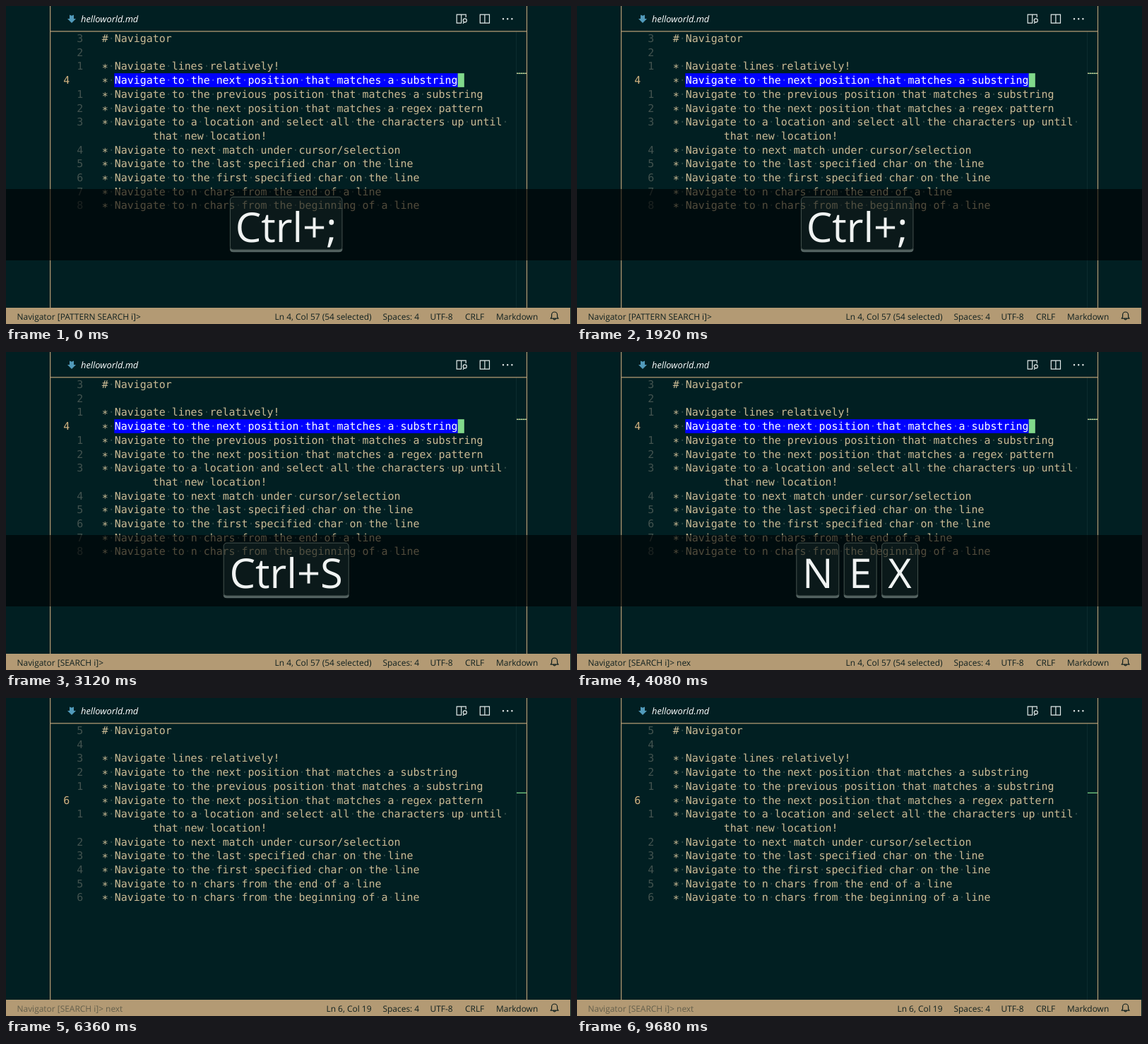
An HTML page that plays this animation: 800x450 px, repeating every 9.72 s.

```html
<!DOCTYPE html>
<html lang="en">
<head>
<meta charset="utf-8">
<title>Navigator</title>
<style>
  html, body { margin: 0; height: 100%; overflow: hidden; background: #011f22; }
  svg { display: block; width: 800px; height: 450px; text-rendering: geometricPrecision; }
  .code { font: 14.95px "DejaVu Sans Mono", monospace; fill: #cbbb95; white-space: pre; }
  .dot { fill: #2f4947; }
  .gutter { fill: #43534f; text-anchor: end; }
  .gutter.active { fill: #d3b381; text-anchor: start; }
  .selected { fill: #fff; }
  .selected .dot { fill: #5560ee; }
  .ui { font: 11.95px "Open Sans", "Noto Sans", sans-serif; fill: #10201f; }
  .title { font: italic 12.85px "Open Sans", "Noto Sans", sans-serif; fill: #fff; }
  .key { font: 58px "Open Sans", "Noto Sans", sans-serif; fill: #f0f3f2; text-anchor: middle; }
  .icon { fill: none; stroke: #e4eae9; stroke-width: 1.2; }
</style>
</head>
<body>
<svg viewBox="0 0 800 450">
  <rect width="800" height="450" fill="#011f22"/>
  <g id="lines"></g>
  <g id="selection"></g>
  <g id="cursor">
    <rect width="9.1" height="19.7" fill="#81d98b"/>
    <text id="under" class="code" y="15" style="fill:#011f22"></text>
  </g>

  <path d="M722.5 36V427" stroke="#0c2c2f"/>
  <path id="mark" d="M723 0H737.5" stroke="#6fc17b" stroke-width="1.4"/>
  <path id="markDashes" d="M723 0H737.5" stroke="#d2c49c" stroke-width="1.3" stroke-dasharray="2 1"/>
  <path d="M62.6 0V427M737.5 0V427M62 35.9H738" stroke="#b59b74" stroke-width="1.2"/>

  <path d="M90 12.5l3 1.2 3-1.2V18h3l-6 6-6-6h3z" fill="#519aba"/>
  <text class="title" x="106" y="23">helloworld.md</text>
  <g class="icon">
    <path d="M645 24.2H638.2V12.2H651.2V16M644.7 12.2V24.2M647 24.8l2-2.2"/>
    <circle cx="649.8" cy="20.4" r="2.5"/>
    <path d="M671.3 12.2H684.5V24.2H671.3zM677.9 12.2V24.2"/>
  </g>
  <path d="M704 18.2h.01M710.2 18.2h.01M716.4 18.2h.01" stroke="#e4eae9" stroke-width="2.4" stroke-linecap="round"/>

  <rect y="427" width="799" height="23" fill="#b39a74"/>
  <g class="ui">
    <text id="prompt" x="15.5" y="444"></text>
    <text id="position" x="517.5" y="444" text-anchor="end"></text>
    <text x="533.5" y="444">Spaces: 4</text>
    <text x="600.5" y="444">UTF-8</text>
    <text x="650" y="444">CRLF</text>
    <text x="694" y="444">Markdown</text>
  </g>
  <path class="icon" style="stroke:#10201f" d="M771.3 442.2l1.3-2.4V437a4 4 0 0 1 8 0v2.8l1.3 2.4zM775 442.6a1.7 1.7 0 0 0 3.3 0"/>

  <g id="overlay">
    <rect y="259" width="800" height="101" fill-opacity=".6"/>
    <g id="keys"></g>
  </g>
</svg>
<script>
const LOOP = 9720, LEFT = 135.7, PITCH = 9, ROW = 19.69, TOP = 36.1;
const CTRL_S = 2520, ENTER = 4440, HIDE = 5450, FADE = 250;
const TYPED = [['N', 3600], ['E', 3800], ['X', 4000], ['T', 4220], ['Enter', ENTER]];
const KEY_WIDTH = { 'Ctrl+;': 159.5, 'Ctrl+S': 178, N: 61, E: 47, X: 52, T: 47, Enter: 150 };
const TARGET = 'Navigate to the next position that matches a substring';
const WRAPPED = 7;
const ROWS = [
  '# Navigator', '', '∗ Navigate lines relatively!',
  '∗ ' + TARGET,
  '∗ Navigate to the previous position that matches a substring',
  '∗ Navigate to the next position that matches a regex pattern',
  '∗ Navigate to a location and select all the characters up until ',
  'that new location!',
  '∗ Navigate to next match under cursor/selection',
  '∗ Navigate to the last specified char on the line',
  '∗ Navigate to the first specified char on the line',
  '∗ Navigate to n chars from the end of a line',
  '∗ Navigate to n chars from the beginning of a line'
];

const $ = id => document.getElementById(id);
const clamp = v => Math.min(1, Math.max(0, v));
const rowTop = i => TOP + i * ROW;
const colX = c => LEFT + c * PITCH;
const codeText = (text, col, row, cls = '') =>
  `<text class="code ${cls}" x="${colX(col)}" y="${rowTop(row) + 15}">` +
  text.split(' ').join('<tspan class="dot">·</tspan>') + '</text>';

$('lines').innerHTML = ROWS.map((text, i) => i === WRAPPED
  ? codeText(text, 8, i)
  : codeText(text, 0, i) + `<text class="code gutter" y="${rowTop(i) + 15}"></text>`).join('');
$('selection').innerHTML =
  `<rect x="${colX(2) - 0.4}" y="${rowTop(3)}" width="${54 * PITCH + 0.4}" height="${ROW}" fill="#00f"/>` +
  codeText(TARGET, 2, 3, 'selected');
const gutters = [...document.querySelectorAll('.gutter')];

// Rebuild a part only when its value changes.
const shown = {};
function update(name, value, render) {
  if (shown[name] === value) return;
  shown[name] = value;
  render(value);
}

function showLine(current) {
  gutters.forEach((el, i) => {
    const distance = Math.abs(i + 1 - current);
    el.classList.toggle('active', !distance);
    el.setAttribute('x', distance ? 109.2 : 81.3);
    el.textContent = distance || current;
  });
  const selecting = current === 4;
  $('selection').style.display = $('markDashes').style.display = selecting ? '' : 'none';
  const markY = selecting ? 95.4 : 134.3;
  for (const id of ['mark', 'markDashes']) $(id).setAttribute('transform', `translate(0 ${markY})`);
  $('cursor').setAttribute('transform', `translate(${colX(selecting ? 56 : 18)} ${rowTop(current - 1)})`);
  $('under').textContent = selecting ? '' : 'n';
  $('position').textContent = selecting ? 'Ln 4, Col 57 (54 selected)' : 'Ln 6, Col 19';
  $('prompt').style.fill = selecting ? '' : '#645f4c';
}

function showKeys(list) {
  const keys = list.split(' '), gap = 6.4;
  let x = 396.7 - keys.reduce((sum, k) => sum + KEY_WIDTH[k] + gap, -gap) / 2;
  $('keys').innerHTML = keys.map(k => {
    const w = KEY_WIDTH[k], left = x;
    x += w + gap;
    return `<g transform="translate(${left} 269.7)">
      <path d="M0 72V74Q0 78.5 5 78.5H${w - 5}Q${w} 78.5 ${w} 74V72Q${w} 75 ${w - 5} 75H5Q0 75 0 72z" fill="#566563"/>
      <rect x=".5" y=".5" width="${w - 1}" height="75" rx="4.5" fill="#4b6462" fill-opacity=".15" stroke="#46534f"/>
      <text class="key" x="${w / 2}" y="64.5">${k}</text></g>`;
  }).join('');
}

// The cursor fades out and back in once a second, and stays solid after a move.
const ease = p => p * p * (3 - 2 * p);
function blink(t) {
  if (t >= ENTER && t < ENTER + 510) return 1;
  const start = t < ENTER ? 20 : 970;
  const phase = (t - start + 1000) % 1000;
  const half = Math.min(phase, 1000 - phase);
  return 1 - ease(clamp((half - 100) / 200));
}

function draw(t) {
  const typed = TYPED.filter(([, at]) => t >= at).map(([k]) => k);
  const word = typed.filter(k => k !== 'Enter').join('').toLowerCase();
  const mode = t < CTRL_S ? 'PATTERN SEARCH' : 'SEARCH';
  update('line', t < ENTER ? 4 : 6, showLine);
  update('prompt', `Navigator [${mode} i]> ${word}`, s => $('prompt').textContent = s);
  update('keys', typed.join(' ') || (t < CTRL_S ? 'Ctrl+;' : 'Ctrl+S'), showKeys);
  $('cursor').style.opacity = blink(t);
  $('overlay').style.opacity = 1 - clamp((t - HIDE) / FADE);
}

const began = performance.now();
function tick() {
  draw((performance.now() - began) % LOOP);
  requestAnimationFrame(tick);
}
tick();
</script>
</body>
</html>
```
